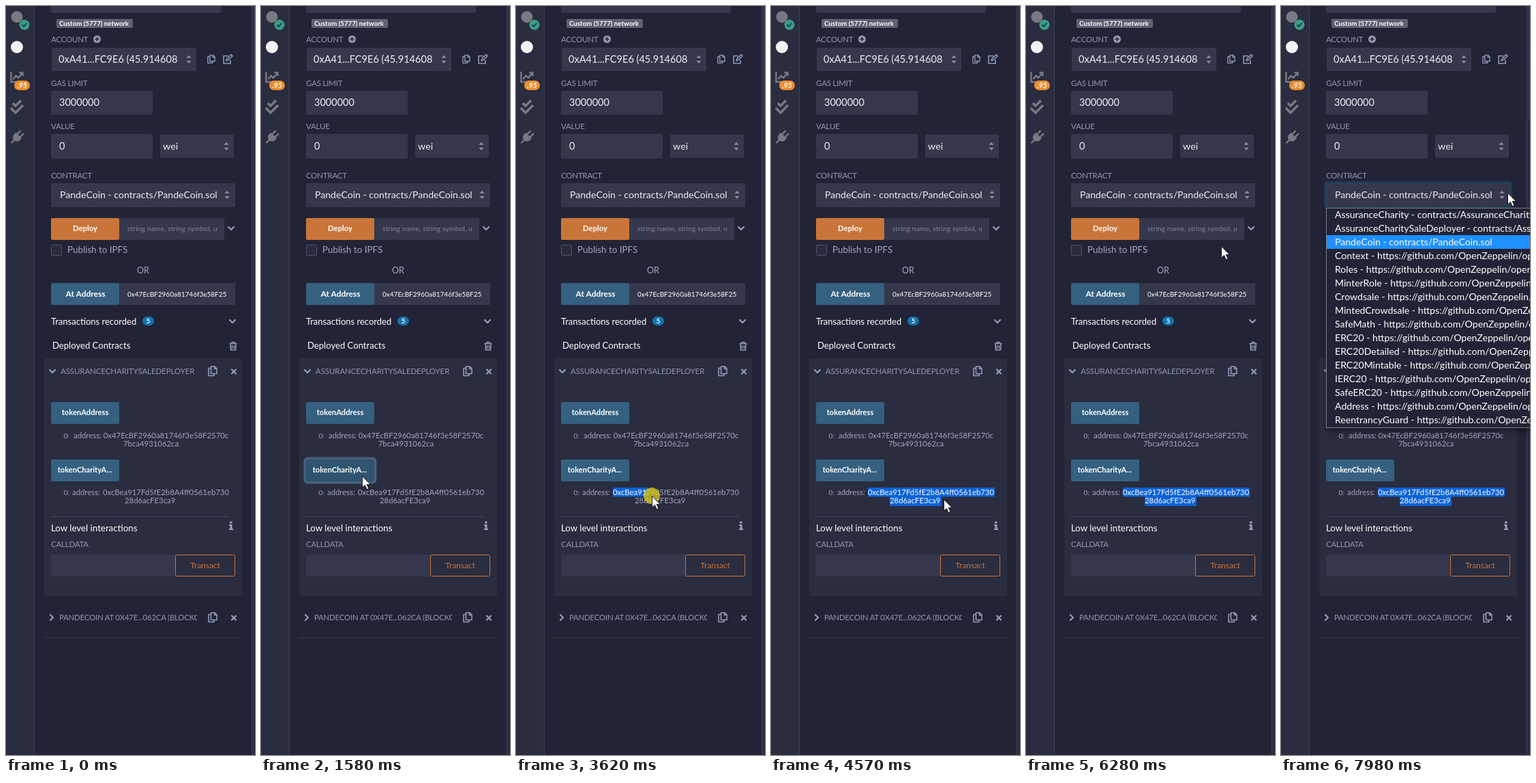
Write an HTML page that moves like this. It is 365 by 1095 pixels and loops after 8000 ms.

```html
<!DOCTYPE html>
<html lang="en">
<head>
<meta charset="utf-8">
<title>Contract panel</title>
<style>
html, body { margin: 0; width: 100%; height: 100%; overflow: hidden; background: #222336; }
svg { display: block; width: 365px; height: 1095px; }
text { font-family: Lato, "Open Sans", sans-serif; white-space: pre; }
.field { fill: #35384c; }
.blue { fill: #35607f; }
.icon { fill: none; stroke: #8f9bb8; stroke-width: 1.6; stroke-linejoin: round; }
.bold { stroke-width: 2.3; stroke-linecap: round; }
.side { fill: none; stroke: #777983; stroke-width: 2.4; }
.thick { stroke-width: 3.6; }
</style>
</head>
<body>
<svg viewBox="0 0 365 1095">
  <defs>
    <g id="copy" class="icon"><path d="M4.500 3.500H1V14.500H9V12M4.500 1H10L13 4V11.500H4.500ZM9.500 1V4.500H13"/></g>
    <path id="down" class="icon bold" d="M-4-2L0 2L4-2"/>
    <path id="cross" class="icon bold" d="M-3-3L3 3M3-3L-3 3"/>
    <path id="sorter" fill="#8a8da0" d="M-3.500-2L0-6L3.500-2ZM-3.500 2L0 6L3.500 2Z"/>
    <clipPath id="inputClip"><rect x="166" y="405" width="158" height="32"/></clipPath>
    <clipPath id="titleClip"><rect x="70" y="880" width="210" height="28"/></clipPath>
    <clipPath id="selClip"><rect id="clip1" x="142" y="704" height="13.500"/><rect id="clip2" x="174" y="717" height="14"/></clipPath>
    <filter id="glow" x="-20%" y="-20%" width="140%" height="140%"><feGaussianBlur stdDeviation="1"/></filter>
    <filter id="shade" x="-10%" y="-10%" width="120%" height="120%"><feGaussianBlur stdDeviation="4"/></filter>
  </defs>

  <rect width="365" height="1095" fill="#222336"/>
  <rect width="41" height="1095" fill="#2a2c3f"/>
  <rect x="41" width="1" height="1095" fill="#40445a"/>
  <rect x="360" width="1" height="1095" fill="#40445a"/>
  <rect x="361" width="4" height="1095" fill="#2a2c3f"/>
  <rect x="363" width="2" height="166" fill="#393c50"/>

  <!-- side bar -->
  <circle cx="16" cy="16" r="8.500" fill="#777983"/>
  <circle cx="27" cy="27.500" r="7.500" fill="#3a9d85"/>
  <path d="M23.500 27.500L26 30L30.500 25" fill="none" stroke="#173b3c" stroke-width="1.800"/>
  <circle cx="16" cy="60" r="9" fill="#f2f2f4"/>
  <path class="side" d="M7.500 96V111H25M10.500 107L14.500 102L18 105L24 98M19.500 97.500H24.500V102.500"/>
  <rect x="12" y="109" width="23" height="14" rx="7" fill="#ec8d2f"/>
  <path class="side thick" d="M10 142L14 146L22 138M7 149L14 156L25 145"/>
  <g transform="translate(16 192) rotate(45)"><path d="M-6-4H6V0A6 6 0 0 1-6 0Z" fill="#777983"/><path class="side" d="M-3-11V-4M3-11V-4M0 4V12"/></g>

  <!-- panel -->
  <g class="field">
    <rect x="66" y="-4" width="249" height="14" rx="2"/>
    <rect x="67" y="61" width="212" height="34" rx="2"/>
    <rect x="66" y="124" width="149" height="35" rx="2"/>
    <rect x="66" y="187" width="149" height="36" rx="2"/>
    <rect x="226" y="188" width="108" height="34" rx="2"/>
    <rect x="66" y="259" width="270" height="35" rx="2"/>
    <rect x="166" y="310" width="154" height="32"/>
    <rect x="166" y="405" width="170" height="32"/>
  </g>
  <rect x="74" y="19" width="112" height="13" rx="2" fill="#5c6272"/>
  <rect x="66" y="310" width="100" height="32" rx="2" fill="#c97539"/>
  <rect x="66.500" y="349.500" width="15" height="15" rx="1" fill="#292b3e" stroke="#50546a"/>
  <rect class="blue" x="66" y="405" width="100" height="32" rx="2"/>
  <rect x="200" y="454" width="17" height="13" rx="6.500" fill="#1474ad"/>
  <rect x="56" y="515" width="290" height="348" rx="2" fill="#2a2c3f"/>
  <rect class="blue" x="66" y="579" width="100" height="32" rx="2"/>
  <rect id="ring" x="64.500" y="661.500" width="103" height="35" rx="4" fill="none" stroke="#5b82a0" stroke-width="2.500" filter="url(#glow)"/>
  <rect id="charity" class="blue" x="66" y="663" width="100" height="32" rx="2"/>
  <path d="M66 746.500H327" stroke="#43475b"/>
  <rect class="field" x="66" y="802" width="182" height="32"/>
  <rect x="248.500" y="802.500" width="87" height="31" rx="2" fill="#2a2c3f" stroke="#c97539"/>
  <path d="M56 923.500H346" stroke="#35384c"/>

  <!-- icons -->
  <circle cx="133.500" cy="48.500" r="5.500" fill="#8f9bb8"/>
  <path d="M130.500 48.500H136.500M133.500 45.500V51.500" stroke="#222336" stroke-width="1.600"/>
  <use href="#sorter" x="268" y="78"/><use href="#sorter" x="323" y="205"/><use href="#sorter" x="324" y="276"/>
  <use href="#copy" transform="translate(295 71) scale(.85)"/>
  <use href="#copy" x="296" y="526"/><use href="#copy" x="296" y="886"/>
  <path class="icon" d="M326 73H319V84H329V79M323 80L324 77L330 71L332 73L326 79Z"/>
  <use href="#down" x="330" y="325"/><use href="#down" x="332" y="461"/><use href="#down" x="68" y="534"/>
  <use href="#down" transform="translate(67 894) rotate(-90)"/>
  <path class="icon" d="M327.500 493.500H338.500M331 493V491.500H335V493M329 494L329.500 503H336.500L337 494M331.500 496V501M334.500 496V501"/>
  <use href="#cross" x="334" y="534.500"/><use href="#cross" x="334" y="894.500"/>
  <path d="M328 753.500H331.500V756.500H328ZM327 758H331.500V764H333V766H327V764H328.500V760H327Z" fill="#9a9fb8"/>

  <g id="labels"></g>
  <g fill="#0b62d6"><rect id="sel1" x="142" y="704" height="13.500"/><rect id="sel2" x="174" y="717" height="14"/></g>
  <g id="selText" clip-path="url(#selClip)"></g>

  <rect id="focus" x="65" y="258" width="272" height="37" rx="3" fill="none" stroke="#20506f" stroke-width="2" filter="url(#glow)"/>
  <g id="menu">
    <rect x="68" y="300" width="310" height="321" opacity=".45" filter="url(#shade)"/>
    <rect x="66.500" y="295.500" width="310" height="321" fill="#222336" stroke="#7d7f8a"/>
    <rect x="67" y="335" width="300" height="20" fill="#1e90ff"/>
  </g>
  <g id="tip"><rect x="342.500" y="288.500" width="40" height="24" fill="#fff" stroke="#767676"/></g>
  <circle id="press" r="12" fill="#ded01f" opacity=".75"/>
  <path id="cursor" d="M.5.5V17L4.400 13.400L7.200 19.700L9.900 18.500L7.200 12.400H12.300Z" fill="#fff" stroke="#111" stroke-width=".9"/>
</svg>
<script>
const $ = id => document.getElementById(id);
const MUTED = '#9196b3', PALE = '#a2a5bd', LIGHT = '#ececf2', WHITE = '#fff';

// y is the middle of the capital letters; baselines sit on whole pixels
function label(parent, str, x, y, size, fill, attrs = {}) {
  const el = document.createElementNS('http://www.w3.org/2000/svg', 'text');
  Object.entries({ x, y: Math.round(y + size * .36), 'font-size': size, fill, ...attrs })
    .forEach(([key, value]) => el.setAttribute(key, value));
  el.textContent = str;
  $(parent).append(el);
}
const put = (...args) => label('labels', ...args);
const bold = { 'font-weight': 700 };
const tight = { 'letter-spacing': -.2 };
const middle = { ...bold, 'text-anchor': 'middle' };
const OPTION_SIZE = 14.1;

put('.95', 23.5, 116, 10.5, WHITE, { ...middle, 'font-style': 'italic' });
put('Custom (5777) network', 78, 25.5, 9.7, WHITE, bold);
[['ACCOUNT', 48.5], ['GAS LIMIT', 112.5], ['VALUE', 175.5], ['CONTRACT', 247.5], ['CALLDATA', 786.5]]
  .forEach(([str, y]) => put(str, 66, y, 11.5, MUTED, tight));
put('0xA41...FC9E6 (45.914608', 77, 78, 14.55, LIGHT);
put('3000000', 78, 141, 14.5, LIGHT);
put('0', 78, 205, 14.5, LIGHT);
put('wei', 230, 205, 14.3, LIGHT);
put('PandeCoin - contracts/PandeCoin.sol', 79, 276, OPTION_SIZE, LIGHT);
put('Deploy', 116, 325, 11.3, WHITE, middle);
put('string name, string symbol, u', 178, 325.5, 10.3, '#7f839c', { 'letter-spacing': .1 });
put('Publish to IPFS', 90, 356.5, 13.4, PALE);
put('OR', 192, 386, 12.6, PALE);
put('At Address', 116.5, 421, 12, WHITE, middle);
put('0x47EcBF2960a81746f3e58F2570c', 178, 421, 10, WHITE, { 'clip-path': 'url(#inputClip)' });
put('Transactions recorded', 66, 461.5, 13, WHITE);
put('5', 208.5, 460.5, 9.5, WHITE, middle);
put('Deployed Contracts', 68, 496.5, 13.1, WHITE);
put('ASSURANCECHARITYSALEDEPLOYER', 80, 534, 11.5, MUTED, { 'letter-spacing': -.1 });
put('tokenAddress', 116, 594, 11.2, WHITE, middle);
put('tokenCharityA...', 115.5, 678, 11.1, WHITE, middle);
[628, 711].forEach(y => put('0:', 84.5, y, 10, PALE));
put('address: 0x47EcBF2960a81746f3e58F2570c', 99, 628, 11.35, PALE);
put('7bca4931062ca', 172, 640, 11.35, PALE);
put('address:', 97, 711, 11.35, PALE);
const hashLines = [['0xcBea917Fd5fE2b8A4ff0561eb730', 142, 711], ['28d6acFE3ca9', 174, 723]];
hashLines.forEach(([str, x, y]) => {
  put(str, x, y, 11.35, PALE);
  label('selText', str, x, y, 11.35, WHITE);
});
put('Low level interactions', 66, 763.5, 13.3, WHITE);
put('Transact', 292, 818, 11.9, '#c97539', { 'text-anchor': 'middle' });
put('PANDECOIN AT 0X47E...062CA (BLOCKCHAIN)', 78, 894, 11.4, MUTED, { ...tight, 'clip-path': 'url(#titleClip)' });

const local = ['AssuranceCharity - contracts/AssuranceCharity.sol',
  'AssuranceCharitySaleDeployer - contracts/AssuranceCharitySaleDeployer.sol',
  'PandeCoin - contracts/PandeCoin.sol'];
const imported = 'Context Roles MinterRole Crowdsale MintedCrowdsale SafeMath ERC20 ERC20Detailed ERC20Mintable IERC20 SafeERC20 Address ReentrancyGuard'
  .split(' ').map(name => name + ' - https://github.com/OpenZeppelin/openzeppelin-contracts');
[...local, ...imported].forEach((str, i) => label('menu', str, 79, 305 + i * 20, OPTION_SIZE, WHITE));
label('tip', 'co', 350, 300.5, 12, '#575757');

// pointer path: time, x, y
const path = [
  [130, 326, 1056], [200, 316, 800], [270, 300, 560], [340, 288, 410], [410, 285, 335], [480, 292, 306],
  [610, 292, 306], [1100, 197, 610], [1450, 148, 687], [2040, 148, 687], [2380, 148, 705],
  [2640, 148, 706], [2710, 148, 707], [2860, 148, 707], [3000, 144, 708], [3130, 144, 708],
  [3620, 199, 716], [3970, 243, 721], [4040, 245, 721], [4170, 245, 721], [4310, 253, 721],
  [4570, 253, 721], [5320, 267, 657], [5550, 245, 600], [5760, 229, 520], [6000, 248, 430],
  [6140, 265, 380], [6280, 286, 351], [6560, 316, 302], [6840, 332, 273], [8000, 332, 273]];

// the screen refreshes in 70 ms ticks during these bursts and rests between them
const bursts = [[130, 480], [680, 1450], [2110, 2380], [2640, 2710], [2930, 3000], [3200, 3970],
  [4040, 4040], [4240, 4310], [4570, 5320], [5390, 6140], [6210, 6840]];

function tick(t) {
  const [start, end] = bursts.filter(b => b[0] <= t).pop() || [0, 0];
  return Math.min(start + 70 * Math.floor((t - start) / 70), end);
}
function pointer(t) {
  const i = Math.max(1, path.findIndex(p => p[0] >= t));
  const [a, b] = [path[i - 1], path[i]];
  const k = Math.max(0, (t - a[0]) / (b[0] - a[0]));
  return [1, 2].map(n => a[n] + (b[n] - a[n]) * k);
}
const show = (id, on) => $(id).setAttribute('visibility', on ? 'visible' : 'hidden');
const within = (t, a, b) => t >= a && t < b;

function selection(t, x, y) {
  if (t < 3200) return [0, 0];
  if (t >= 3970) return [186, 76];
  const chars = width => Math.max(0, Math.floor(width / 6.4) * 6.4);
  return y < 716.5 ? [chars(x - 142), 0] : [186, Math.min(76, chars(x - 174))];
}

function draw(t) {
  const [x, y] = pointer(tick(t));
  const place = `translate(${Math.round(x)} ${Math.round(y)})`;
  $('cursor').setAttribute('transform', place);
  $('press').setAttribute('transform', place);
  show('cursor', t >= 130);
  show('press', within(t, 1510, 1580) || within(t, 3200, 4570) || within(t, 7770, 7910));
  show('ring', within(t, 1510, 3200));
  $('charity').style.fill = t < 2200 && y > 663 && x < 166 ? '#2e546f' : '';
  selection(t, x, y).forEach((w, i) =>
    ['sel', 'clip'].forEach(id => $(id + (i + 1)).setAttribute('width', w)));
  show('tip', within(t, 7370, 7770));
  show('focus', t >= 7770);
  show('menu', t >= 7840);
  $('menu').setAttribute('opacity', t < 7910 ? .6 : 1);
}
function loop(now) {
  draw(now % 8000);
  requestAnimationFrame(loop);
}
draw(0);
requestAnimationFrame(loop);
</script>
</body>
</html>
```
